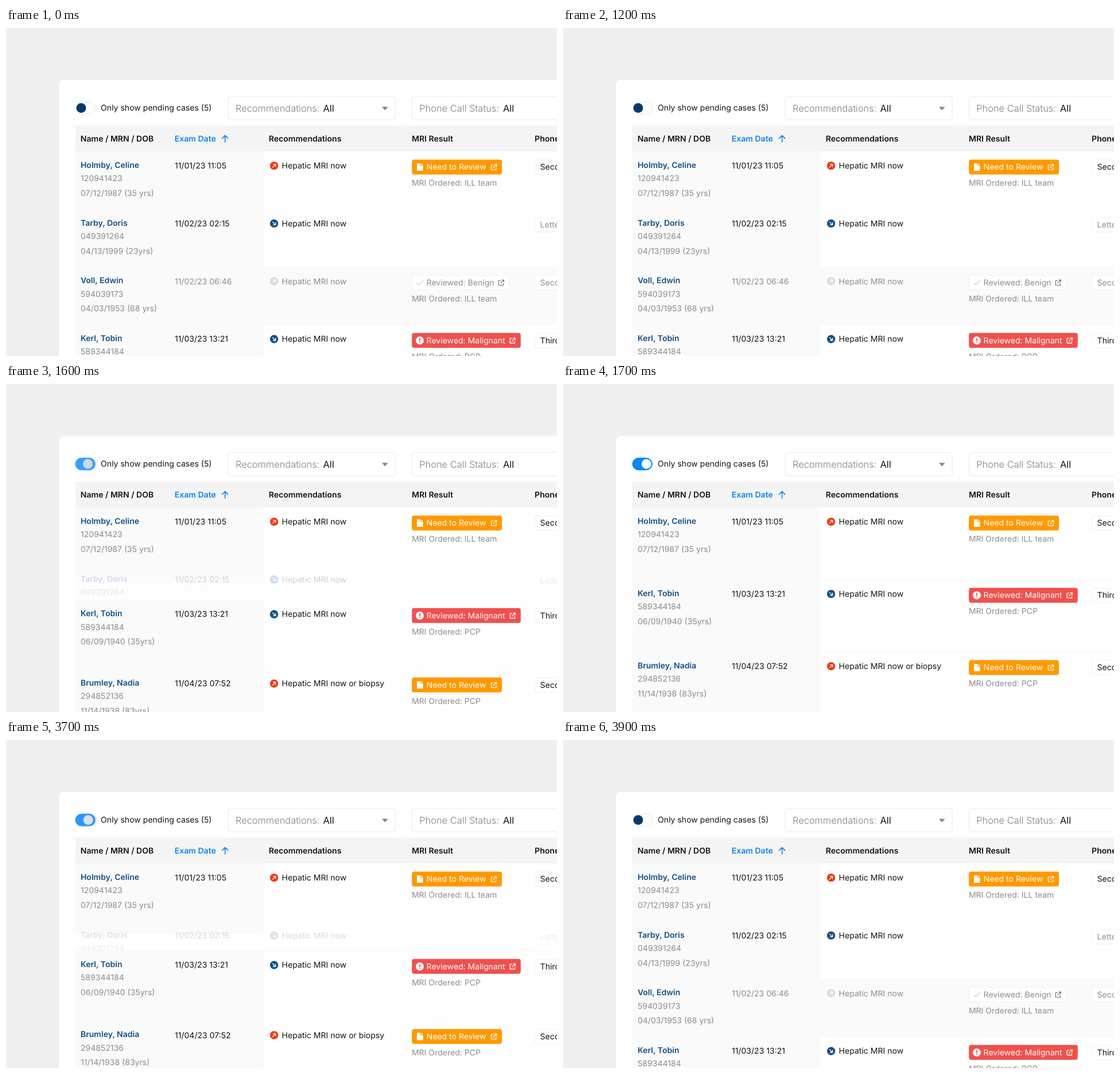
Recreate the animation shown at these times as an HTML page. Size 960 by 572 pixels, loop 4130 ms.

```html
<!DOCTYPE html>
<html lang="en">
<head>
<meta charset="utf-8">
<title>Pending cases</title>
<style>
html, body { margin: 0; width: 100%; height: 100%; overflow: hidden; background: #f0f0f0; }
svg { display: block; width: 100vw; height: 100vh; }
text {
  font: 400 14.05px Inter, sans-serif;
  font-optical-sizing: none;
  text-rendering: geometricPrecision;
  fill: #141414;
  white-space: pre;
}
.bold { font-weight: 600; }
.name { font-weight: 600; fill: #144f86; }
.soft { fill: #8c8c8c; }
.inv { fill: #fff; }
.filter { font-size: 16.4px; }
.light { font-weight: 300; fill: #808080; }
.line { fill: none; stroke-linecap: round; stroke-linejoin: round; }
</style>
</head>
<body>
<svg id="stage" viewBox="0 0 960 572">
  <rect width="960" height="572" fill="#f0f0f0"/>
  <rect x="92.5" y="90.5" width="900" height="520" rx="9" fill="#fff"/>
  <g id="rows"></g>
  <g id="top"></g>
  <rect id="track" x="121" y="129" width="34.5" height="21" rx="10.5"/>
  <circle id="knob" cy="139.5" r="8.5"/>
</svg>
<script>
const $ = id => document.getElementById(id);
const LOOP = 4130, STEP = 100;
const TOP = 215.2, SHORT = 100.8, TALL = 126;
const NAVY = '#144f86', RED = '#f23c0e', GREY = '#dcdcdc';

const text = (x, y, s, cls = '') => `<text x="${x}" y="${y}" class="${cls}">${s}</text>`;
const box = (x, y, w, h, fill, more = '') =>
  `<rect x="${x}" y="${y}" width="${w}" height="${h}" fill="${fill}" ${more}/>`;
const line = (d, color, w = 1.4) =>
  `<path class="line" d="${d}" stroke="${color}" stroke-width="${w}"/>`;
const outlined = (x, y, w, h, color) => box(x, y, w, h, '#fff', `rx="4" stroke="${color}"`);

// Round recommendation badge with a diagonal arrow
function badge(color, up) {
  const d = up ? 'M464.6 27.4L469.6 22.4M465.6 22.4H469.6V26.4'
               : 'M464.6 22.4L469.6 27.4M465.6 27.4H469.6V23.4';
  return `<circle cx="467.1" cy="24.9" r="7.2" fill="${color}"/>` + line(d, '#fff', 1.3);
}

const linkIcon = (x, color) =>
  line(`M${x + 4} 23.6H${x + .7}V31.9H${x + 9}V28.6M${x + 4.2} 28.4L${x + 9.8} 22.8M${x + 6.4} 22.7H${x + 9.9}V26.2`, color, 1.3);

const fileIcon = '<path d="M717 20.7H722V25.2H726.6V32.8Q726.6 33.8 725.6 33.8H717Q716 33.8 716 32.8V21.7Q716 20.7 717 20.7ZM723 20.7L726.6 24.2H723Z" fill="#fff"/>';
const alertIcon = '<circle cx="721" cy="27.3" r="7" fill="#fff"/>' +
  line('M721 23.6V27.8M721 30.6V30.7', '#f0504e', 1.8);
const checkIcon = line('M715.6 28L719.2 31.4L726.8 23.8', '#cfcfcf', 1.2);

const results = {
  review: { label: 'Need to Review', w: 156.8, fill: '#ff9900', icon: fileIcon, link: 844.8 },
  bad: { label: 'Reviewed: Malignant', w: 189.6, fill: '#f0504e', icon: alertIcon, link: 877.5 },
  good: { label: 'Reviewed: Benign', w: 169, icon: checkIcon, link: 857.5 }
};

function resultCell(kind, team) {
  const r = results[kind];
  if (!r) return '';
  const pill = r.fill ? box(707.2, 14.2, r.w, 26, r.fill, 'rx="4"')
                      : outlined(707.5, 14.9, r.w, 25, '#f0f0f0');
  return pill + r.icon + text(732.6, 32.1, r.label, r.fill ? 'inv' : 'soft') +
    linkIcon(r.link, r.fill ? '#fff' : '#808080') +
    text(706.9, 60.2, 'MRI Ordered: ' + team, 'soft');
}

const patients = [
  { name: 'Holmby, Celine', mrn: '120941423', dob: '07/12/1987 (35 yrs)', date: '11/01/23 11:05',
    color: RED, up: 1, result: 'review', team: 'ILL team', call: 'Second' },
  { name: 'Tarby, Doris', mrn: '049391264', dob: '04/13/1999 (23yrs)', date: '11/02/23 02:15',
    color: NAVY, call: 'Letter', softCall: 1, hides: 1 },
  { name: 'Voll, Edwin', mrn: '594039173', dob: '04/03/1953 (68 yrs)', date: '11/02/23 06:46',
    color: GREY, up: 1, result: 'good', team: 'ILL team', call: 'Second', softCall: 1, dim: 1, hides: 1 },
  { name: 'Kerl, Tobin', mrn: '589344184', dob: '06/09/1940 (35yrs)', date: '11/03/23 13:21',
    color: NAVY, result: 'bad', team: 'PCP', call: 'Third' },
  { name: 'Brumley, Nadia', mrn: '294852136', dob: '11/14/1938 (83yrs)', date: '11/04/23 07:52',
    color: RED, up: 1, rec: 'Hepatic MRI now or biopsy', result: 'review', team: 'PCP', call: 'Second' }
];

function rowMarkup(p, i) {
  const tone = p.dim ? 'soft' : '';
  return `<g><rect class="bg" x="120.5" width="840" fill="${p.dim ? '#fafafa' : '#fff'}"/>` +
    '<rect class="bg" x="120.5" width="328" fill="#fafafa"/>' +
    (i ? box(120.5, 0, 840, 1, '#f8f8f8') : '') +
    text(129.9, 28.5, p.name, 'name') +
    text(130, 51.9, p.mrn, 'soft') +
    text(130, 77.6, p.dob, 'soft') +
    text(294, 29.8, p.date, tone) +
    badge(p.color, p.up) +
    text(480.6, 29.8, p.rec || 'Hepatic MRI now', tone) +
    resultCell(p.result, p.team) +
    outlined(921.5, 14.9, 90, 25, '#f0f0f0') +
    text(930.6, 32.1, p.call, p.softCall ? 'soft' : '') + '</g>';
}

$('rows').innerHTML = patients.map(rowMarkup).join('');
$('top').innerHTML =
  text(165.1, 144.2, 'Only show pending cases (5)') +
  outlined(387.2, 119.3, 291, 40.7, '#e8e8e8') +
  text(400, 146, 'Recommendations:', 'filter light') +
  text(552.5, 146, 'All', 'filter') +
  '<path d="M655 137.6H665.6L660.3 143.6Z" fill="#858585"/>' +
  outlined(707.5, 119.3, 291, 40.7, '#e8e8e8') +
  text(720.3, 146, 'Phone Call Status:', 'filter light') +
  text(866, 146, 'All', 'filter') +
  box(120.5, 170, 840, 45.2, '#f4f4f4') +
  text(129.8, 198.1, 'Name / MRN / DOB', 'bold') +
  `<text x="293.7" y="198.1" class="bold" style="fill:#0d83f2">Exam Date</text>` +
  line('M381.7 199V187.6M376.8 192.4L381.7 187.4L386.6 192.4', '#0d83f2', 1.6) +
  text(457.8, 198.1, 'Recommendations', 'bold') +
  text(707, 198.1, 'MRI Result', 'bold') +
  text(921.1, 198.1, 'Phone Call', 'bold');

const rows = [...$('rows').children];
const lerp = (a, b, p) => a + (b - a) * p;
const mix = (a, b, p) => `rgb(${a.map((v, i) => Math.round(lerp(v, b[i], p)))})`;
const ease = t => { t = Math.min(1, Math.max(0, t)); return t * t * (3 - 2 * t); };

function draw(ms) {
  const t = Math.floor(ms % LOOP / STEP) * STEP;
  const p = ease((t - 1422) / 250) - ease((t - 3639) / 250);
  let slot = 0;
  rows.forEach((g, i) => {
    const hides = patients[i].hides;
    const y = TOP + (hides ? i * SHORT : lerp(i * SHORT, slot++ * TALL, p));
    const h = hides ? SHORT : lerp(SHORT, TALL, p);
    g.setAttribute('transform', `translate(0 ${y.toFixed(2)})`);
    g.setAttribute('opacity', hides ? 1 - p : 1);
    g.querySelectorAll('.bg').forEach(r => r.setAttribute('height', h));
  });
  const blue = [5, 134, 250];
  $('track').setAttribute('fill', mix([255, 255, 255], blue, p));
  $('track').setAttribute('stroke', mix([230, 230, 230], blue, p));
  $('knob').setAttribute('fill', mix([4, 57, 112], [255, 255, 255], p));
  $('knob').setAttribute('cx', lerp(131, 145.4, p));
}

const start = performance.now();
function tick() {
  draw(performance.now() - start);
  requestAnimationFrame(tick);
}
tick();
</script>
</body>
</html>
```
